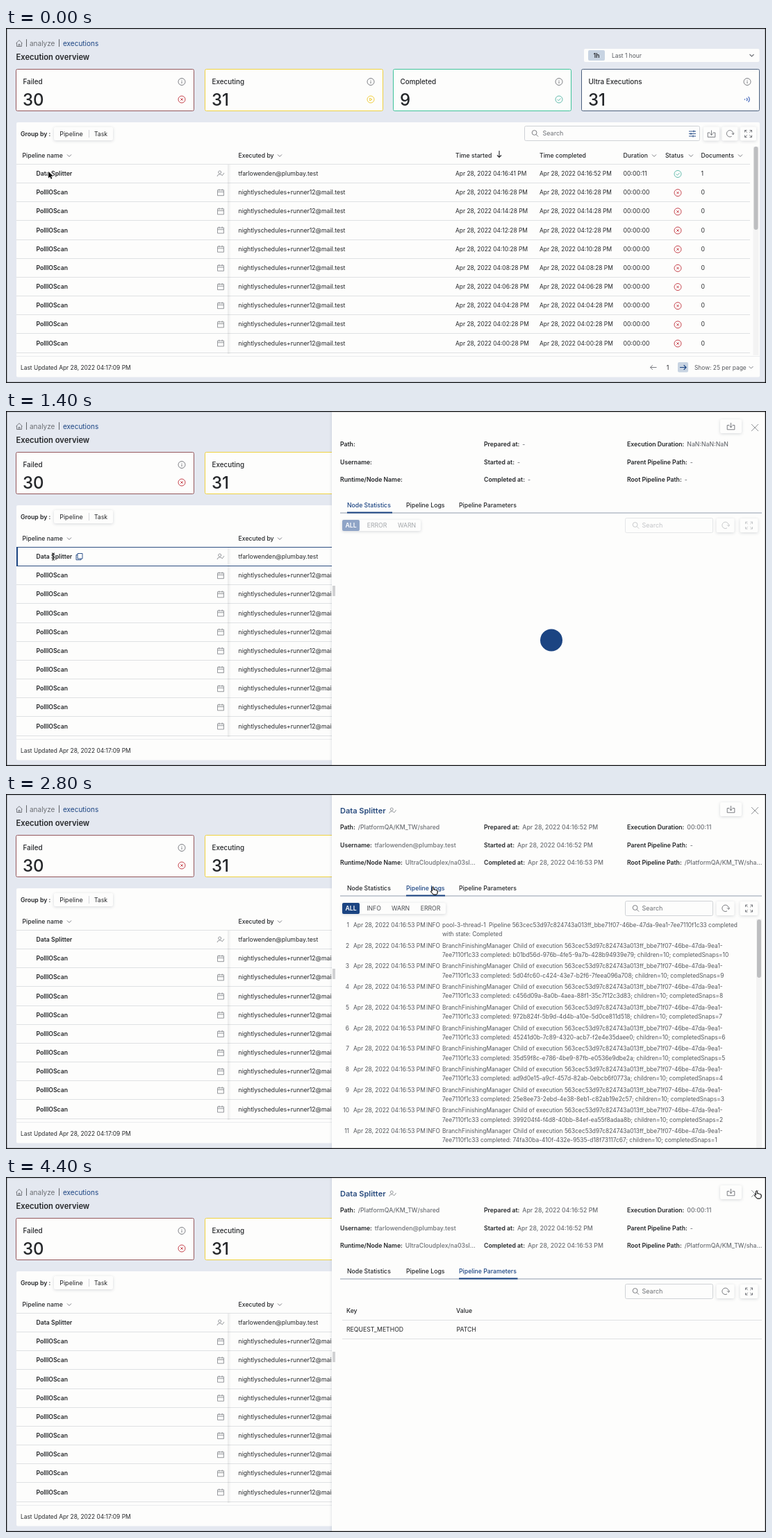
An HTML page with a canvas that plays this animation: 1094 by 512 pixels, repeating every 4600 ms.

```html
<!DOCTYPE html>
<html lang="en">
<head>
<meta charset="utf-8">
<title>Execution overview</title>
<style>
html, body { margin: 0; width: 100%; height: 100%; overflow: hidden; }
canvas { display: block; }
</style>
</head>
<body>
<canvas id="stage" width="1094" height="512"></canvas>
<script>
const ctx = document.getElementById('stage').getContext('2d');
const LOOP = 4600, STEP = 200;
const INK = '#242629', GREY = '#6c6f74', SOFT = '#a3a6aa', FAINT = '#c2c4c7', NAVY = '#1b4482',
  RED = '#c0303a', GOLD = '#efc92f', TEAL = '#53b5a4', PAPER = '#fdfdfc', RULE = '#dfe1e3';
const PIPELINE = 'Data Splitter', JOB = 'PollIOScan', SERVICE = 'BranchFinishingManager',
  OWNER = 'tfarlowenden@plumbay.test', ROBOT = 'nightlyschedules+runner12@mail.test';

const ICON = {
  chevron: 'M-3-1.5L0 1.5L3-1.5',
  close: 'M-5-5L5 5M5-5L-5 5',
  cross: 'M-1.7-1.7L1.7 1.7M1.7-1.7L-1.7 1.7',
  check: 'M-2.4 0L-.6 1.8L2.5-1.5',
  play: 'M-1.3-2L2 0L-1.3 2Z',
  info: 'M0-.8V2.6M0-2.7V-1.8',
  waves: 'M-3.5-.7V.7M-.8-2.2Q1 0-.8 2.2M1.6-4Q4.8 0 1.6 4',
  home: 'M-4.5 0L0-4.3L4.5 0M-3.5-1V4.5H3.5V-1M-1 4.5V1.5H1V4.5',
  calendar: 'M-4.5-3.5H4.5V4.5H-4.5ZM-4.5-.8H4.5M-2.2-5V-2.5M2.2-5V-2.5',
  user: 'M-3.3-2A2 2 0 1 0 .7-2A2 2 0 1 0-3.3-2M-5 4Q-4.5 1-1.3 1Q.5 1 1.2 2.2M1 1.5L2.4 2.8L5-1',
  copy: 'M-2.5-4.5H4.5V3H-2.5ZM-2.5-2.5H-4.5V4.7H2.5V3',
  search: 'M-4.3-1A3.4 3.4 0 1 0 2.5-1A3.4 3.4 0 1 0-4.3-1M1.6 1.6L4.6 4.6',
  sliders: 'M-5-3.5H5M-5 0H5M-5 3.5H5M2-5V-2M-2-1.5V1.5M1 2V5',
  download: 'M-2-1.5H-5.3V4.8H5.3V-1.5H2M0-5V2M-2-.3L0 2L2-.3',
  refresh: 'M2.5 3.8A4.7 4.7 0 1 1 4.7 .5M2.6-.6L4.7 1.5L6.2-1',
  expand: 'M-5-2V-5H-2M2-5H5V-2M5 2V5H2M-2 5H-5V2M-5-5L-1.8-1.8M5-5L1.8-1.8M5 5L1.8 1.8M-5 5L-1.8 1.8',
  left: 'M4.5 0H-4.5M-1.2-3.3L-4.5 0L-1.2 3.3',
  right: 'M-4.5 0H4.5M1.2-3.3L4.5 0L1.2 3.3',
  down: 'M0-5V4.5M-3 1.5L0 4.5L3 1.5'
};
const POINTER = {
  arrow: new Path2D('M0 0V9.5L2.3 7.4L3.8 10.8L5.4 10.1L3.9 6.8H7Z'),
  hand: new Path2D('M0 6V1Q0 0 1 0Q2 0 2 1V4Q4.5 3.6 5 4.6Q7.5 4.4 7.5 6V8Q7.5 10 6 11H1.8L-1.8 7Q-2.2 5.6-.8 5.9Z'),
  beam: new Path2D('M-2-5Q0-5 0-4Q0-5 2-5M0-4V4M-2 5Q0 5 0 4Q0 5 2 5')
};

function text(s, x, y, { size = 8.7, weight = 400, color = INK, align = 'left' } = {}) {
  ctx.font = `${weight} ${size}px Inter, "Open Sans", sans-serif`;
  ctx.fillStyle = color;
  ctx.textAlign = align;
  ctx.fillText(s, x, y + size * 0.36);
  return ctx.measureText(s).width;
}
function icon(name, x, y, color = GREY, width = 0.9) {
  ctx.save();
  ctx.translate(x, y);
  ctx.strokeStyle = color;
  ctx.lineWidth = width;
  ctx.stroke(new Path2D(ICON[name]));
  ctx.restore();
}
function badge(name, x, y, color) {
  ctx.strokeStyle = color;
  ctx.lineWidth = 0.9;
  ctx.beginPath();
  ctx.arc(x, y, 5, 0, 7);
  ctx.stroke();
  icon(name, x, y, color);
}
function box(x, y, w, h, fill, { r = 0, border, shadow } = {}) {
  ctx.save();
  ctx.beginPath();
  ctx.roundRect(x, y, w, h, r);
  if (shadow) {
    ctx.shadowColor = 'rgba(40,50,70,.18)';
    ctx.shadowBlur = 4;
    ctx.shadowOffsetY = 1;
  }
  ctx.fillStyle = fill;
  ctx.fill();
  ctx.shadowColor = 'transparent';
  if (border) {
    ctx.strokeStyle = border;
    ctx.lineWidth = 1;
    ctx.stroke();
  }
  ctx.restore();
}
const rule = (x1, x2, y, color = RULE, h = 1) => box(x1, y, x2 - x1, h, color);
const button = (name, x, y, color = GREY, w = 26) => {
  box(x - w / 2, y - 10, w, 20, PAPER, { r: 2, shadow: true });
  icon(name, x, y, color);
};
function heading(label, x, y, chevronX) {
  text(label, x, y, { weight: 500 });
  if (chevronX) icon('chevron', chevronX, y + 0.5);
}
function searchBox(x, y, w, color) {
  box(x, y - 10.5, w, 21, PAPER, { r: 2, border: color === FAINT ? '#e4e6e8' : '#cfd2d6' });
  icon('search', x + 15, y, color);
  text('Search', x + (w > 200 ? 26 : 24), y, { size: 9, color });
}
function scrollbar(x, top, bottom, thumbTop, thumbBottom) {
  box(x - 1, top, 8, bottom - top, '#f3f3f3');
  box(x, thumbTop, 6, thumbBottom - thumbTop, '#bdbec0', { r: 3 });
}

function card(x, label, count, color, name, iconColor) {
  box(x, 59.5, 256, 60, PAPER, { r: 2, border: color });
  text(label, x + 10, 77, { size: 9.9, weight: 500 });
  text(count, x + 9.5, 103.5, { size: 24, weight: 500 });
  badge('info', x + 238.5, 77.5, GREY);
  name === 'waves' ? icon(name, x + 238.5, 103, iconColor, 1.1) : badge(name, x + 238.5, 103, iconColor);
}
const clock = s => `Apr 28, 2022 04:${s} PM`;

function overview(hover) {
  box(0, 0, 1094, 512, '#e4e8f0');
  icon('home', 19, 22, GREY);
  text('|', 28, 22, { size: 9 });
  text('analyze', 34, 22, { size: 10, color: GREY });
  text('|', 75, 22, { size: 9 });
  text('executions', 82, 22, { size: 10, color: NAVY });
  text('Execution overview', 14.5, 42, { size: 11.2, weight: 600 });

  box(832, 30, 252.5, 19, PAPER, { r: 2 });
  box(838, 32, 24, 15, '#c8d4e2', { r: 2 });
  text('1h', 850, 39.5, { weight: 600, align: 'center' });
  text('Last 1 hour', 872, 39.5, { size: 8.4, color: '#54575c' });
  icon('chevron', 1073.5, 39.5, GREY, 1.1);

  card(14.5, 'Failed', '30', '#94575c', 'cross', RED);
  card(286.5, 'Executing', '31', '#efd23f', 'play', GOLD);
  card(557.5, 'Completed', '9', '#3fc39a', 'check', TEAL);
  card(828.5, 'Ultra Executions', '31', '#4a5f7d', 'waves', '#3158b5');

  box(15, 136, 1070, 367.5, PAPER, { r: 2 });
  text('Group by :', 21, 152.5, { weight: 600 });
  box(69, 143, 85, 19, PAPER, { r: 2, shadow: true });
  text('Pipeline', 94, 152.5, { size: 9, align: 'center' });
  text('Task', 136.5, 152.5, { align: 'center' });
  box(119, 147, 1, 11, '#d5d7da');
  searchBox(746.5, 152, 252, GREY);
  icon('sliders', 988, 152.5, NAVY);
  ['download', 'refresh', 'expand'].forEach((name, i) => button(name, 1015.5 + 26.5 * i, 152.5, GREY, 23));

  heading('Pipeline name', 23.5, 183.5, 91);
  heading('Executed by', 334.5, 183.5, 394);
  heading('Time started', 647, 183.5);
  icon('down', 710, 182, INK, 1.1);
  heading('Time completed', 768, 183.5);
  heading('Duration', 888.5, 183.5, 933);
  heading('Status', 949, 183.5, 986);
  heading('Documents', 1000.5, 183.5, 1057);
  rule(15, 1071, 196);

  for (let i = 0; i < 10; i++) {
    const y = 210 + 27.17 * i, first = i === 0;
    const start = first ? '16:41' : `${String(18 - 2 * i).padStart(2, '0')}:28`;
    text(first ? PIPELINE : JOB, 43.5, y, { weight: 600 });
    icon(first ? 'user' : 'calendar', 309, y, '#8b8e92');
    text(first ? OWNER : ROBOT, 334.5, y);
    text(clock(start), 647, y, { size: 8.4 });
    text(clock(first ? '16:52' : start), 768, y, { size: 8.4 });
    text(first ? '00:00:11' : '00:00:00', 888.5, y);
    badge(first ? 'check' : 'cross', 967, y + 0.5, first ? TEAL : RED);
    text(first ? '1' : '0', 1000.5, y);
    rule(15, 1071, Math.round(y + 13));
  }
  const shade = ctx.createLinearGradient(319, 0, 324, 0);
  shade.addColorStop(0, 'rgba(80,85,95,.11)');
  shade.addColorStop(1, 'rgba(80,85,95,0)');
  box(319, 197, 5, 273, shade);
  rule(15, 1085, 473, '#ebecee');
  scrollbar(1076.5, 171, 472, 171, 291);

  if (hover) {
    rule(15, 1071, 196, '#2c4d80');
    rule(15, 1071, 223, '#2c4d80');
    box(15, 196, 2, 28, NAVY);
    icon('copy', 105.5, 210, NAVY);
  }

  text('Last Updated ' + clock('17:09'), 21, 489.5, { size: 8.4 });
  icon('left', 932, 489.5, GREY);
  text('1', 952.5, 489.5, { align: 'center' });
  box(967, 482, 15, 14.5, '#c8d4e2', { r: 2 });
  icon('right', 974.5, 489.5, NAVY, 1.2);
  text('Show: 25 per page', 991, 489.5, { size: 8.4, color: '#54575c' });
  icon('chevron', 1072.5, 489.5);
}

const FIELDS = [
  ['Path:', '', '/PlatformQA/KM_TW/shared'],
  ['Prepared at:', '-', clock('16:52')],
  ['Execution Duration:', 'NaN:NaN:NaN', '00:00:11'],
  ['Username:', '', OWNER],
  ['Started at:', '-', clock('16:52')],
  ['Parent Pipeline Path:', '-', '-'],
  ['Runtime/Node Name:', '', 'UltraCloudplex/na03sl…'],
  ['Completed at:', '-', clock('16:53')],
  ['Root Pipeline Path:', '-', '/PlatformQA/KM_TW/sha…']
];
const TABS = [['Node Statistics', 491, 65], ['Pipeline Logs', 576, 56], ['Pipeline Parameters', 652, 84.5]];

function filters(items, end, loading) {
  box(484, 157, end - 484, 16, PAPER, { r: 2, shadow: true });
  box(484, 157, 25, 16, loading ? '#8fa4c6' : NAVY, { r: 2 });
  text('ALL', 496.5, 165, { weight: 600, color: '#fff', align: 'center' });
  for (const [label, x] of items)
    text(label, x, 165, { color: loading ? SOFT : '#4b4e53', align: 'center' });
}
function tools(x, color = GREY) {
  searchBox(x, 165, 126, color);
  button('refresh', x + 144, 165, color);
  button('expand', x + 178, 165, color);
}

function statistics() {
  filters([['ERROR', 534], ['WARN', 577]], 597);
  tools(882.5);
  heading('Node', 490, 193, 519.5);
  heading('Duration', 642, 193, 688);
  heading('View', 715, 193);
  heading('Bytes', 838, 193, 870.5);
  heading('Documents', 889.5, 193, 946);
  heading('Rate', 976.5, 193, 1004);
  [206, 233, 437, 490].forEach(y => rule(484, 1080, y));
  [['JSON Generator', '170', 219.5], [PIPELINE, '173', 335], ['Mapper', '139', 463.5]].forEach(([name, ms, y]) => {
    badge('check', 497.5, y, '#7fa598');
    text(name, 511.5, y);
    text('00:00:00.' + ms, 642, y, { size: 8.4 });
  });
  const row = (view, y, rate = 0) => {
    text(view, 715, y, { size: 9 });
    text('0', 838, y);
    text(rate ? '1' : '0', 889.5, y);
    text('0B/s', 976.5, y);
    text(rate + ' Doc/s', 1027, y, { size: 8.5 });
  };
  row('output0', 219.5, 5.6);
  const views = ['input0', ...[5, 4, 6, 1, 3, 2, 0].map(n => 'output' + n)];
  views.forEach((view, i) => row(view, 246.5 + 25.3 * i, { input0: 5.5, output4: 10 }[view]));
  row('input0', 451);
  row('output0', 476.3);
  row('input0', 503.5, 6.2);
  scrollbar(1081, 155, 511, 156, 294);
}

const CHILDREN = [
  'b01bd56d-976b-4fe5-9a7b-428b94939e79', '5d04fc60-c424-43e7-b2f6-7feea096a708',
  'c456d09a-8a0b-4aea-88f1-35c7f12c3d83', '972b824f-5b9d-4d4b-a10e-5d0ce811d518',
  '45241d0b-7c89-4320-acb7-f2e4e35daee0', '35d59f8c-e786-4be9-87fb-e0536e9dbe2a',
  'ad9d0e15-a9cf-457d-82ab-0ebcb6f0773a', '25e8ee73-2ebd-4e38-8eb1-c82ab19e2c57',
  '399204f4-f4d8-40bb-84ef-ea55f8adaa8b', '74fa30ba-410f-432e-9535-d18f73117c67'
];
function logs() {
  filters([['INFO', 529.5], ['WARN', 568], ['ERROR', 611]], 633);
  tools(891.5);
  const style = { size: 8.4, color: '#54575c' };
  const run = '563cec53d97c824743a013ff_bbe71f07-46be-47da-9ea1-', tail = '7ee7110f1c33';
  for (let i = 0; i < 11; i++) {
    const y = 189 + 29.7 * i;
    text(i + 1, 494, y, { ...style, align: 'right' });
    text(clock('16:53'), 500, y, style);
    text('INFO', 605, y, style);
    if (i === 0) {
      text('pool-3-thread-1', 628, y, style);
      text(`Pipeline ${run}${tail} completed`, 695, y, style);
      text('with state: Completed', 628, y + 13.3, style);
    } else {
      text(SERVICE, 628, y, style);
      text('Child of execution ' + run, 730, y, style);
      text(`${tail} completed: ${CHILDREN[i - 1]}; children=10; completedSnaps=${11 - i}`, 628, y + 13.3, style);
    }
  }
  scrollbar(1081, 180, 511, 181, 265);
}

function parameters() {
  tools(891.5);
  heading('Key', 490, 193);
  heading('Value', 648, 193);
  rule(484, 1088, 206);
  text('REQUEST_METHOD', 490, 219.5);
  text('PATCH', 648.5, 219.5);
  rule(484, 1088, 233);
}

function loading() {
  filters([['ERROR', 534], ['WARN', 577]], 597, true);
  tools(891.5, FAINT);
  ctx.fillStyle = NAVY;
  ctx.beginPath();
  ctx.arc(785, 330.5, 16, 0, 7);
  ctx.fill();
}

function panel(t) {
  const ready = t >= 1600, tab = t >= 4000 ? 2 : t >= 2800 ? 1 : 0;
  box(469, 0, 625, 512, PAPER, { shadow: true });
  box(470.5, 252, 1, 15, SOFT);
  box(472.5, 252, 1, 15, SOFT);
  button('download', 1043.5, 22, GREY, 31);
  icon('close', 1078, 24, '#85888c');
  if (ready) {
    const w = text(PIPELINE, 481, 24, { size: 11, weight: 600, color: '#274a7d' });
    icon('user', 481 + w + 10, 24, '#8b8e92');
  }
  FIELDS.forEach(([label, empty, value], i) => {
    const x = [481, 688, 894][i % 3], y = 48 + 25.4 * Math.floor(i / 3);
    const w = text(label, x, y, { weight: 600 });
    text(ready ? value : empty, x + w + 4, y, { weight: 500, color: GREY });
  });
  rule(481, 1088, 146.5, '#8f9cad');
  TABS.forEach(([label, x, w], i) => {
    text(label, x, 136, { weight: 500, color: i === tab ? NAVY : INK });
    if (i === tab) rule(x, x + w, 145.5, NAVY, 2);
  });
  (ready ? [statistics, logs, parameters][tab] : loading)();
}

// time, x, y, shape used from that time on
const TRAIL = [
  [0, 61, 207, 'arrow'], [200, 68, 210, 'beam'], [1400, 68, 210, 'beam'], [1600, 544, 149, 'arrow'],
  [2200, 613.5, 134, 'hand'], [3000, 613.5, 134, 'hand'], [3400, 673.5, 133.5, 'hand'],
  [4000, 673.5, 133.5, 'hand'], [4200, 1079.5, 20, 'hand'], [LOOP, 1079.5, 20, 'hand']
];
function pointer(t) {
  const i = TRAIL.findIndex(p => p[0] > t);
  const [t0, x0, y0, shape] = TRAIL[i - 1], [t1, x1, y1] = TRAIL[i];
  const k = (t - t0) / (t1 - t0);
  ctx.save();
  ctx.translate(x0 + (x1 - x0) * k, y0 + (y1 - y0) * k);
  ctx.lineJoin = 'round';
  ctx.lineWidth = shape === 'arrow' ? 1.6 : 1;
  ctx.strokeStyle = shape === 'arrow' ? '#fff' : '#111';
  ctx.fillStyle = shape === 'arrow' ? '#111' : '#fff';
  ctx.stroke(POINTER[shape]);
  if (shape !== 'beam') ctx.fill(POINTER[shape]);
  if (shape === 'hand') ctx.stroke(POINTER.hand);
  ctx.restore();
}

function draw(now) {
  const t = Math.floor((now % LOOP) / STEP) * STEP;
  overview(t >= 200 && t < 1600);
  if (t >= 1000) panel(t);
  pointer(t);
  ctx.strokeStyle = '#0c0d10';
  ctx.lineWidth = 2.6;
  ctx.strokeRect(0, 0, 1094, 512);
  requestAnimationFrame(draw);
}
draw(0);
</script>
</body>
</html>
```
